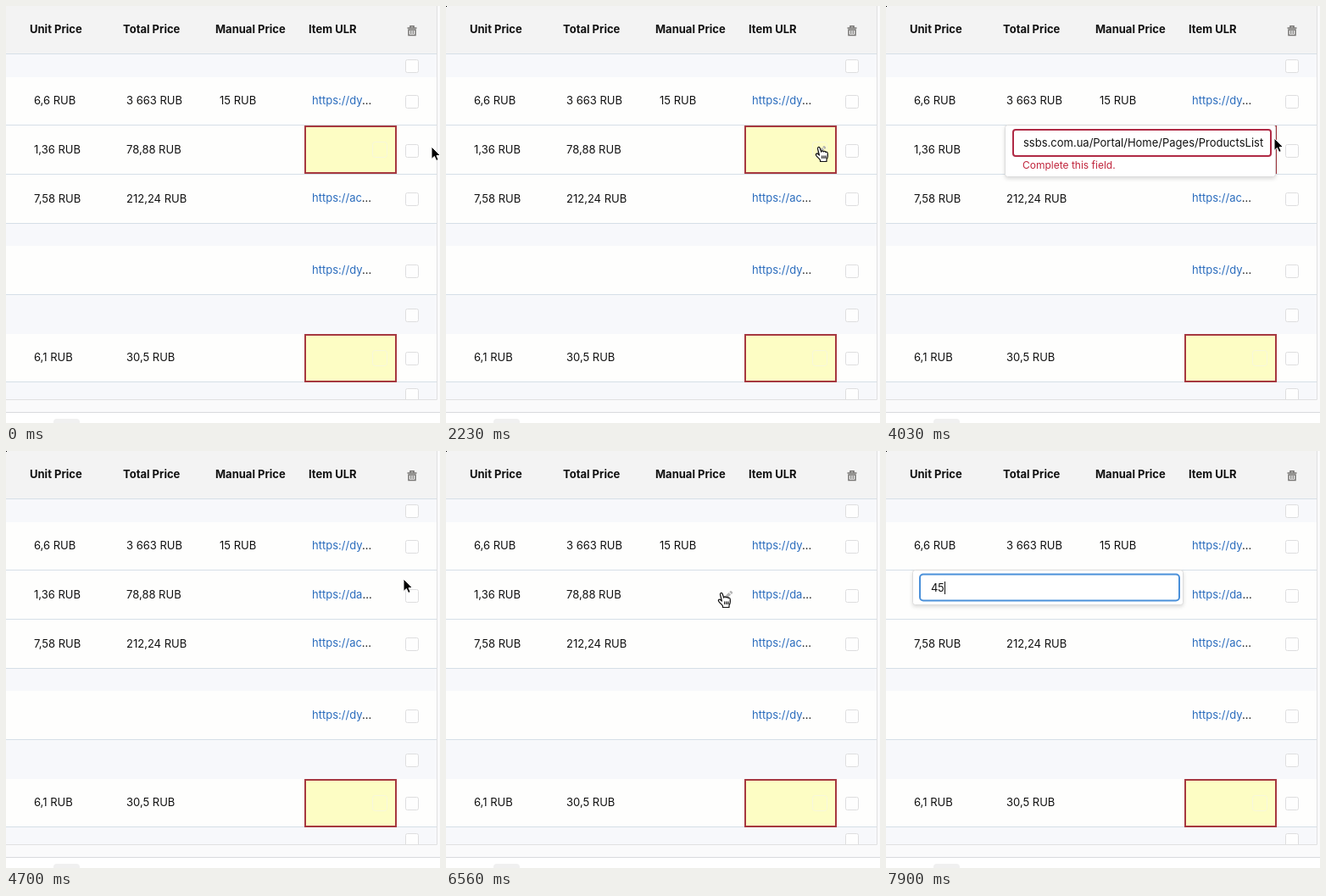
Write an HTML page that moves like this. It is 512 by 492 pixels and loops after 8000 ms.

```html
<!DOCTYPE html>
<html lang="en">
<head>
<meta charset="utf-8">
<title>Inline table editing</title>
<style>
html, body { margin: 0; width: 100%; height: 100%; overflow: hidden; background: #fff; }
svg { display: block; width: 512px; height: 492px; }
text { font: 13px Inter, sans-serif; fill: #111; }
.head text { font-weight: 700; }
.link { fill: #2a6cbd; }
.error { font-size: 12px; fill: #c0253c; }
.row { fill: #fefefd; }
.line { stroke: #d6dfe7; }
.box { fill: #fefefe; stroke: #dededf; }
.need { fill: #fdfdc4; stroke: #a6383f; stroke-width: 2; }
.ghost { fill: none; stroke: #f7f7dc; }
.panel { fill: #fff; stroke: #dcdcdc; filter: drop-shadow(0 2px 2px #0002); }
.field { fill: #fff; stroke-width: 2; }
.pencil { fill: #b3b3b3; }

/* Parts that appear and vanish at once */
.step { visibility: hidden; animation: 8s step-end infinite; }
.dot { animation-name: dot; }
.empty { animation-name: empty; }
.cellHover { animation-name: cellHover; }
.urlEdit { animation-name: urlEdit; }
.pasted { animation-name: pasted; }
.saved { animation-name: saved; }
.linkHover { animation-name: linkHover; }
.priceHover { animation-name: priceHover; }
.priceEdit { animation-name: priceEdit; }
.four { animation-name: four; }
.five { animation-name: five; }
.caret0 { animation-name: caret0; }
.caret1 { animation-name: caret1; }
.arrow { animation-name: arrow; }
.hand { animation-name: hand; }
.beam { animation-name: beam; }
@keyframes dot { 0.375% { visibility: visible } }
@keyframes empty { 0% { visibility: visible } 55% { visibility: hidden } }
@keyframes cellHover { 20% { visibility: visible } 29% { visibility: hidden } }
@keyframes urlEdit { 29% { visibility: visible } 55% { visibility: hidden } }
@keyframes pasted { 42% { visibility: visible } 55% { visibility: hidden } }
@keyframes saved { 55% { visibility: visible } }
@keyframes linkHover { 67.5% { visibility: visible } 72% { visibility: hidden } }
@keyframes priceHover { 72% { visibility: visible } 83.3% { visibility: hidden } }
@keyframes priceEdit { 83.3% { visibility: visible } }
@keyframes four { 94.5% { visibility: visible } }
@keyframes five { 98.75% { visibility: visible } }
@keyframes caret0 { 83.3% { visibility: visible } 89.5% { visibility: hidden } }
@keyframes caret1 { 94.5% { visibility: visible } 98.75% { visibility: hidden } }
@keyframes arrow {
  0% { visibility: visible } 22% { visibility: hidden }
  49.2% { visibility: visible } 70% { visibility: hidden }
}
@keyframes hand {
  22% { visibility: visible } 29% { visibility: hidden }
  70% { visibility: visible } 83.3% { visibility: hidden }
}
@keyframes beam {
  29% { visibility: visible } 49.2% { visibility: hidden }
  83.3% { visibility: visible } 94.5% { visibility: hidden }
}

.pointer { animation: move 8s linear infinite; }
@keyframes move {
  0%, 13.75% { transform: translate(502px, 166px) }
  17% { transform: translate(479px, 167px) }
  23.75%, 28% { transform: translate(442px, 167px) }
  34.5%, 48.75% { transform: translate(447.5px, 167px) }
  50.375% { transform: translate(458px, 156px) }
  54%, 66.25% { transform: translate(469px, 151px) }
  71.25% { transform: translate(360px, 163px) }
  75.375%, 100% { transform: translate(327px, 168px) }
}
</style>
</head>
<body>
<svg viewBox="0 0 512 492">
  <defs>
    <rect id="check" class="box" x="471.5" y="-7.5" width="15" height="15" rx="2"/>
    <path id="pencil" class="pencil" d="M-5.5 5.5l1-3.6 6-6 2.6 2.6-6 6zM2.3-4.7l1-1q.7-.6 1.4 0l1.2 1.2q.6.7 0 1.4l-1 1z"/>
    <g id="need">
      <rect class="need" x="353" y="1" width="107" height="55"/>
      <rect class="ghost" x="432.500" y="19.500" width="17" height="18" rx="3"/>
    </g>
    <clipPath id="table"><path d="M0 0H512V464H0z"/></clipPath>
  </defs>

  <path fill="#fff" d="M0 0H512V492H0z"/>
  <path fill="#f7f8fb" d="M0 57H508V464H0z"/>
  <path fill="#f3f3f3" d="M0 0H508V56H0z"/>
  <path fill="#fafafb" d="M509 0H512V465H509zM0 465H512V479H0z"/>
  <path class="row" d="M0 84H508V256H0zM0 283H508V340H0zM0 387H508V443H0z"/>
  <path class="line" d="M0 56.500H508M0 140.500H508M0 198.500H508M0 256.500H508M0 340.500H508M0 443.500H508"/>
  <path stroke="#e0e0e1" fill="none" d="M508.500 0V464.500H0"/>
  <path stroke="#d9dade" d="M0 479.500H512"/>
  <rect x="56" y="487" width="31" height="12" rx="4" fill="#f0f0f0"/>

  <g class="head">
    <text x="28" y="32">Unit Price</text>
    <text x="138" y="32">Total Price</text>
    <text x="247" y="32">Manual Price</text>
    <text x="357" y="32">Item ULR</text>
  </g>
  <g fill="none" stroke="#777573">
    <path stroke-width="1.600" d="M473.500 26H484.500M477 25.500V23.800H481V25.500"/>
    <path stroke-width="1.500" d="M475 28V34.600H483V28z"/>
    <path stroke-width="1.200" d="M477.700 29V33M480.300 29V33"/>
  </g>

  <g>
    <text x="33" y="116">6,6 RUB</text>
    <text x="142" y="116">3 663 RUB</text>
    <text x="252" y="116">15 RUB</text>
    <text x="33" y="174">1,36 RUB</text>
    <text x="142" y="174">78,88 RUB</text>
    <text x="33" y="232">7,58 RUB</text>
    <text x="142" y="232">212,24 RUB</text>
    <text x="33" y="419">6,1 RUB</text>
    <text x="142" y="419">30,5 RUB</text>
    <text x="361" y="116"><tspan class="link">https://dy</tspan>...</text>
    <text x="361" y="231"><tspan class="link">https://ac</tspan>...</text>
    <text x="361" y="316"><tspan class="link">https://dy</tspan>...</text>
  </g>

  <g clip-path="url(#table)">
    <use href="#check" y="71"/><use href="#check" y="113"/>
    <use href="#check" y="171"/><use href="#check" y="228"/>
    <use href="#check" y="313"/><use href="#check" y="365"/>
    <use href="#check" y="416"/><use href="#check" y="459"/>
  </g>

  <use href="#need" y="387"/>
  <use class="step empty" href="#need" y="141"/>
  <use class="step cellHover" href="#pencil" x="442" y="171"/>

  <g class="step saved">
    <text x="361" y="174"><tspan class="link">https://da</tspan>...</text>
  </g>
  <g class="step linkHover">
    <path stroke="#2a6cbd" d="M361 175.500H419"/>
    <use href="#pencil" x="442" y="171"/>
  </g>
  <use class="step priceHover" href="#pencil" x="332" y="171"/>

  <g class="step urlEdit">
    <rect class="panel" x="140.500" y="140.500" width="319" height="61" rx="3"/>
    <rect class="field" x="150" y="146" width="304" height="31" rx="3" stroke="#b02a45"/>
    <text class="error" x="161" y="192">Complete this field.</text>
  </g>
  <text class="step pasted" x="162" y="166">ssbs.com.ua/Portal/Home/Pages/ProductsList</text>

  <g class="step priceEdit">
    <rect class="panel" x="31.500" y="140.500" width="319" height="41" rx="3"/>
    <rect class="field" x="40" y="145.500" width="306" height="31" rx="4" stroke="#4a90d9"/>
  </g>
  <text class="step four" x="53" y="166">4</text>
  <path class="step caret0" stroke="#111" d="M53.500 154V169"/>
  <path class="step caret1" stroke="#111" d="M61.500 154V169"/>
  <g class="step five">
    <text x="61" y="166">5</text>
    <path stroke="#111" d="M69.500 154V169"/>
  </g>

  <g class="pointer" stroke-linejoin="round">
    <path class="step arrow" fill="#000" stroke="#fff" d="M0 0V14.500L3.400 11.400 5.700 16.500 8.200 15.400 6 10.500H10.500z"/>
    <path class="step hand" fill="#fff" stroke="#111" stroke-width="1.200" d="M-3.500 1.500C-4-.7-1.500-1.300-.8.700L.8 5.200C.8 3.600 3 3.500 3.400 5 3.700 3.900 5.600 4 5.900 5.600 6.500 4.800 8 5.200 8.200 6.700 8.700 10 8.500 12 7 14V16.500H-.5V14.800C-2 13-3.500 11.500-5.300 9.300-6.500 7.500-4.300 6.500-2.900 7.900L-1.600 9zM1.700 9.500V13M3.900 9.500V13M6 9.500V13"/>
    <g class="step beam" fill="none" stroke-linecap="round">
      <path stroke="#fff" stroke-width="3" d="M-3-7.500Q0-7.500 0-5V5.500Q0 8-3 8M3-7.500Q0-7.500 0-5M0 5.500Q0 8 3 8M-2 3H2"/>
      <path stroke="#111" stroke-width="1.200" d="M-3-7.500Q0-7.500 0-5V5.500Q0 8-3 8M3-7.500Q0-7.500 0-5M0 5.500Q0 8 3 8M-2 3H2"/>
    </g>
  </g>
  <path class="step dot" d="M0 0H1V1H0z"/>
</svg>
</body>
</html>
```
